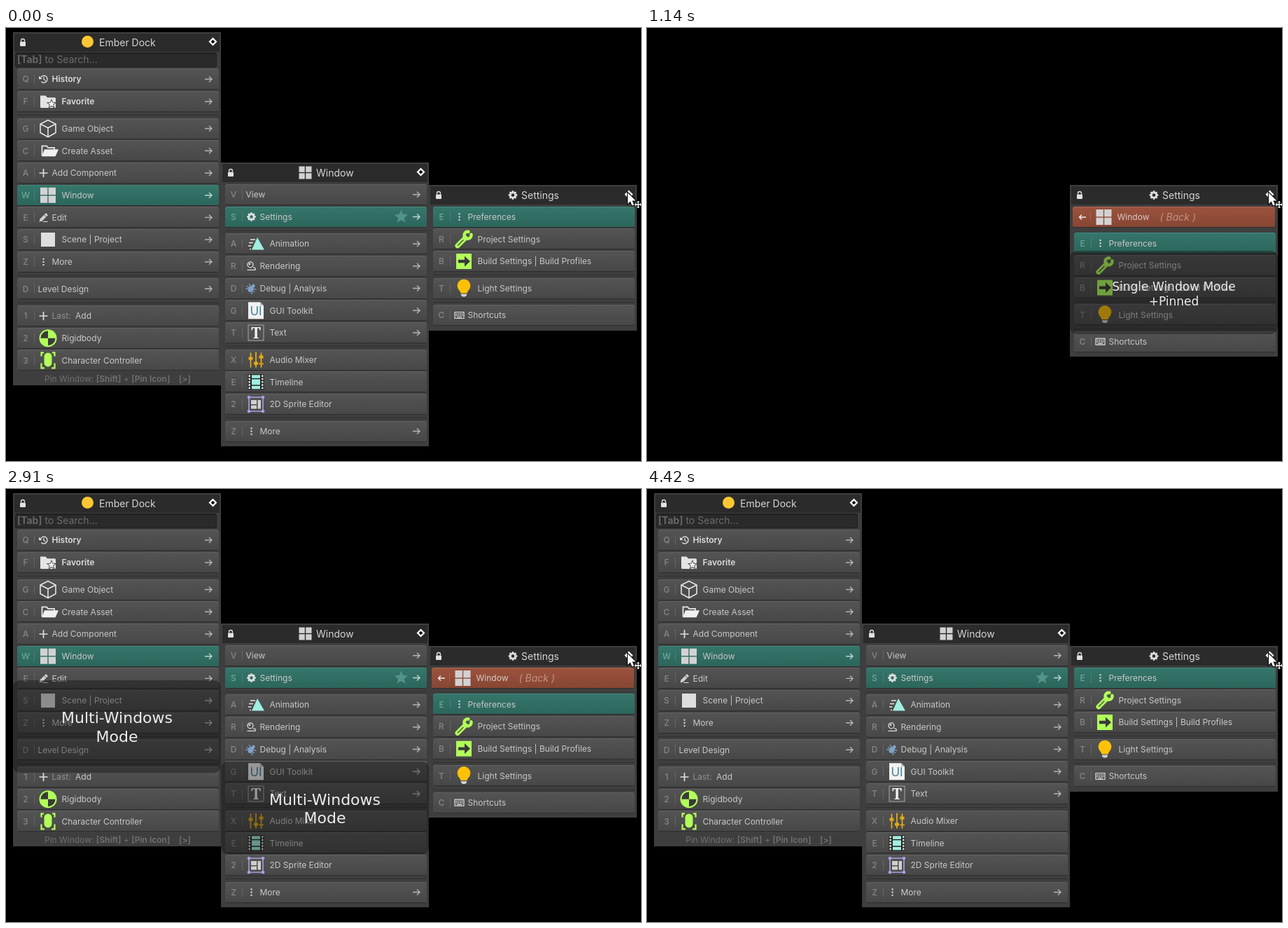
These frames come from a looping animation (907x618 px, 4490 ms). An HTML page with a canvas:

```html
<!DOCTYPE html>
<html lang="en">
<head>
<meta charset="utf-8">
<title>Menu windows</title>
<style>
  html, body { margin: 0; width: 100%; height: 100%; overflow: hidden; background: #000; }
  canvas { display: block; width: 907px; height: 618px; }
</style>
</head>
<body>
<canvas id="stage" width="907" height="618"></canvas>
<script>
const ctx = document.getElementById('stage').getContext('2d');
const LOOP = 4490;
const INTER = 'Inter, sans-serif';
const LIME = '#b2ff59', PALE = '#dedede', DARK = '#3a3a3a';

function rect(x, y, w, h, fill) {
  ctx.fillStyle = fill;
  ctx.fillRect(x, y, w, h);
}
function rounded(x, y, w, h, r, fill) {
  ctx.beginPath();
  ctx.roundRect(x, y, w, h, r);
  ctx.fillStyle = fill;
  ctx.fill();
}
function fillPath(d, color) {
  ctx.fillStyle = color;
  ctx.fill(new Path2D(d));
}
function strokePath(d, color, width = 1.4) {
  ctx.strokeStyle = color;
  ctx.lineWidth = width;
  ctx.stroke(new Path2D(d));
}
function disc(x, y, r, fill) {
  ctx.beginPath();
  ctx.arc(x, y, r, 0, Math.PI * 2);
  ctx.fillStyle = fill;
  ctx.fill();
}
function arc(x, y, r, from, to, color, width) {
  ctx.beginPath();
  ctx.arc(x, y, r, from, to);
  ctx.strokeStyle = color;
  ctx.lineWidth = width;
  ctx.stroke();
}
function text(str, x, y, color, font = '12px ' + INTER, align = 'left') {
  ctx.font = font;
  ctx.textAlign = align;
  ctx.fillStyle = color;
  ctx.fillText(str, x, y);
  return ctx.measureText(str).width;
}
function at(x, y, draw) {
  ctx.save();
  ctx.translate(x, y);
  draw();
  ctx.restore();
}
function star(r, color) {
  ctx.beginPath();
  for (let i = 0; i < 10; i++) {
    const a = i * Math.PI / 5 - Math.PI / 2, q = i % 2 ? r * 0.45 : r;
    ctx.lineTo(q * Math.cos(a), q * Math.sin(a));
  }
  ctx.fillStyle = color;
  ctx.fill();
}
function grid(size) {
  const s = size / 2 - 0.7;
  for (const x of [-size / 2, 0.7])
    for (const y of [-size / 2, 0.7]) rect(x, y, s, s, '#d2d2d2');
}

// Icons are drawn around their own centre.
const icons = {
  clock() {
    arc(0.5, 0, 5, -2.7, 2.4, PALE, 1.4);
    fillPath('M-6.5-4.5V0h4.5z', PALE);
    strokePath('M.5-3V.5L3 2', PALE, 1.3);
  },
  favorite() {
    fillPath('M-11-8.5h7.5l2.5 2.8H9.5q1.5 0 1.5 1.5V7.5Q11 9 9.500 9h-19Q-11 9-11 7.500z', '#e4e4e4');
    at(5, 3.5, () => { star(7.6, '#4b4b4b'); star(5.2, '#f2f2f2'); });
  },
  cube() {
    strokePath('M0-12L11-6.500V6L0 12-11 6V-6.500zM-11-6.500L0-1 11-6.500M0-1V12', '#e4e4e4', 1.6);
  },
  folder() {
    strokePath('M-8.500 7V-7h6.500l2 2.500H9v3', '#e8e8e8', 1.8);
    fillPath('M-5-2H15L10.500 8H-9z', '#f0f0f0');
  },
  plus() { strokePath('M-6 0H6M0-6V6', PALE, 1.7); },
  window() { grid(22); },
  pencil() {
    fillPath('M-6 6l1-4L3.500-6.500 6.500-3.500-2 5z', '#cfcfcf');
    strokePath('M1-4L4.500-.5', '#505050', 1);
    strokePath('M-1 6H6', '#cfcfcf', 1.2);
  },
  scene() { rect(-10, -10, 20, 20, PALE); },
  dots() { for (const y of [-4.2, 0, 4.2]) rect(-1, y - 1, 2.1, 2.1, PALE); },
  rigid() {
    disc(0, 0, 12.5, LIME);
    fillPath('M0 0V-10.500A10.500 10.500 0 0 0-10.500 0zM0 0V10.500A10.500 10.500 0 0 0 10.500 0z', DARK);
  },
  capsule() {
    rounded(-5.5, -11, 11, 20, 5.5, LIME);
    strokePath('M-6-11H-9.500V-6M6-11H9.500V-6M-9.500 4V11H-5M9.500 4V11H5', LIME, 2.2);
  },
  gear() {
    arc(0, 0, 3.7, 0, 7, PALE, 2.8);
    for (let i = 0; i < 8; i++) {
      ctx.rotate(Math.PI / 4);
      rect(-1.3, -6.3, 2.6, 2.6, PALE);
    }
  },
  motion() {
    fillPath('M2-9L12 8.500H-6z', '#a2eee0');
    strokePath('M-8-6H-1M-10-1.500H-4M-11 3H-6.500M-9 7.500H-7', '#e4e4e4', 1.5);
  },
  render() {
    arc(-1.5, -2, 4, 0, 7, PALE, 1.3);
    strokePath('M-6 5.500H5.500Q7 2 2.500 2', PALE, 1.3);
    disc(-2.500, -3, 1.4, PALE);
  },
  bug() {
    ctx.rotate(0.7);
    ctx.beginPath();
    ctx.ellipse(0, 1, 3.6, 5.2, 0, 0, 7);
    ctx.fillStyle = '#7fa1c6';
    ctx.fill();
    disc(0, -4.500, 2.3, '#7fa1c6');
    strokePath('M-6.500-3L-3-1M6.500-3L3-1M-7 1.500H7M-6 6L-3 3M6 6L3 3', '#7fa1c6', 1.3);
  },
  ui() {
    fillPath('M-11-12H6L11-7V12H-11z', '#f2f2f2');
    fillPath('M6-12L11-7H6z', '#b9c3c6');
    text('UI', 0, 7, '#3f8398', '17px ' + INTER, 'center');
  },
  type() {
    rect(-11.5, -11.5, 23, 23, '#a8a8a8');
    rect(-10.5, -10.5, 21, 21, '#515151');
    text('T', 0, 7.5, '#f4f4f4', 'bold 21px "Noto Serif", serif', 'center');
  },
  mixer() {
    const c = '#e5ac14';
    strokePath('M-7.500-10V11M0-11V11M7.500-10V11', c, 1.8);
    rect(-10.5, -4, 6, 4, c);
    rect(-3, 3, 6, 4, c);
    rect(4.5, -6, 6, 4, c);
    rect(4, 5, 7, 1.5, c);
  },
  film() {
    rect(-11.5, -11, 23, 22, '#242424');
    for (let i = 0; i < 5; i++)
      for (const x of [-10.5, 8]) rect(x, -10 + i * 4.3, 2.5, 2.7, '#d8d8d8');
    rect(-6, -10, 12, 4.500, '#a2eee0');
    rect(-6, -4, 12, 8, '#a2eee0');
    rect(-6, 5.500, 12, 4.500, '#a2eee0');
  },
  sprite() {
    strokePath('M-10-10H10V10H-10z', '#a9a0e2', 1.6);
    for (const x of [-10, 10]) for (const y of [-10, 10]) disc(x, y, 2.3, '#a9a0e2');
    rect(-7, -6, 8, 6, '#cfcfcf');
    rect(-7, 1.5, 8, 5, '#cfcfcf');
    rect(2.5, -6, 4.5, 12.5, '#cfcfcf');
  },
  wrench() {
    ctx.lineCap = 'round';
    strokePath('M-9 9.500L2-1.500', LIME, 7);
    arc(5.5, -5.5, 5, -0.2, 4.9, LIME, 4.5);
    strokePath('M-8.500 9L-1 1.500', '#4a4a4a', 1.3);
  },
  build() {
    rect(-11, -11, 22, 22, LIME);
    fillPath('M-8-2.200H1V-7.500L9 0 1 7.500V2.200H-8z', DARK);
  },
  bulb() {
    fillPath('M-9.500-3.500A9.500 9.500 0 0 1 9.500-3.500Q9 1 5.500 4.500L4.500 7h-9L-5.500 4.500Q-9 1-9.500-3.500z', '#ffc107');
    fillPath('M-4 8H4V10L2 12H-2L-4 10z', '#d0d0d0');
  },
  keys() {
    strokePath('M-6.500-4.500H6.500V4.500H-6.500z', PALE, 1.2);
    for (let i = 0; i < 4; i++)
      for (const y of [-2.8, -0.3]) rect(-5 + i * 2.7, y, 1.7, 1.5, PALE);
    rect(-3.5, 2.2, 7, 1.2, PALE);
  }
};
const SMALL = ['clock', 'plus', 'pencil', 'dots', 'gear', 'render', 'bug', 'keys'];

// Rows: centre y, key, icon, label, flags (a arrow, s selected, b bold, f starred)
const mainMenu = {
  x: 10, y: 6, h: 504, title: 'Ember Dock', titleX: 133,
  mark: () => at(116.5, 19.5, () => disc(0, 0, 8.5, '#fdc633')),
  gaps: [124, 353, 392],
  rows: [
    [73, 'Q', 'clock', 'History', 'ab'], [105, 'F', 'favorite', 'Favorite', 'ab'],
    [143.5, 'G', 'cube', 'Game Object', 'a'], [175.3, 'C', 'folder', 'Create Asset', 'a'],
    [207, 'A', 'plus', 'Add Component', 'a'], [238.7, 'W', 'window', 'Window', 'as'],
    [270.4, 'E', 'pencil', 'Edit', 'a'], [302, 'S', 'scene', 'Scene | Project', 'a'],
    [333.8, 'Z', 'dots', 'More', 'a'], [372.3, 'D', '', 'Level Design', 'a'],
    [411, '1', 'plus', 'Add', 'l'], [442.7, '2', 'rigid', 'Rigidbody', ''],
    [474.4, '3', 'capsule', 'Character Controller', '']
  ]
};
const windowMenu = {
  x: 307, y: 192, h: 405, title: 'Window', titleX: 443,
  mark: () => at(427.5, 206.5, () => grid(18)),
  gaps: [289, 454, 556],
  rows: [
    [237.8, 'V', '', 'View', 'a'], [269.5, 'S', 'gear', 'Settings', 'asf'],
    [308, 'A', 'motion', 'Animation', 'a'], [339.8, 'R', 'render', 'Rendering', 'a'],
    [371.5, 'D', 'bug', 'Debug | Analysis', 'a'], [403.3, 'G', 'ui', 'GUI Toolkit', 'a'],
    [435, 'T', 'type', 'Text', 'a'], [473.6, 'X', 'mixer', 'Audio Mixer', ''],
    [505.3, 'E', 'film', 'Timeline', ''], [537, '2', 'sprite', '2D Sprite Editor', ''],
    [575.5, 'Z', 'dots', 'More', 'a']
  ]
};
const settingsMenu = {
  x: 604, y: 224, h: 208, title: 'Settings', titleX: 736,
  mark: () => at(724, 238.5, icons.gear),
  gaps: [352, 391],
  rows: [
    [269.5, 'E', 'dots', 'Preferences', 's'], [301.2, 'R', 'wrench', 'Project Settings', ''],
    [333, 'B', 'build', 'Build Settings | Build Profiles', ''],
    [371.5, 'T', 'bulb', 'Light Settings', ''], [410, 'C', 'keys', 'Shortcuts', '']
  ]
};

function bar(x, cy, w, tones) {
  const y = Math.round(cy - 15), g = ctx.createLinearGradient(0, y, 0, y + 30);
  g.addColorStop(0, tones[0]);
  g.addColorStop(1, tones[1]);
  rounded(x, y, w, 30, 3, '#2d2d2d');
  rounded(x, y, w, 29, 3, tones[2]);
  rounded(x, y + 1, w, 28, 3, g);
}
function divider(x, cy) {
  rect(x, Math.round(cy) - 7, 1, 14, 'rgba(255,255,255,.13)');
}
function row(x, [cy, key, icon, label, flags]) {
  const on = flags.includes('s');
  bar(x, cy, 288, on ? ['#35766b', '#2c655b', '#438a7e'] : ['#545454', '#474747', '#626262']);
  const base = cy + 4.4;
  text(key, x + 12, base, on ? '#6ba69b' : '#868686', '500 12px ' + INTER, 'center');
  divider(x + 24, cy);
  const small = SMALL.includes(icon);
  if (icon) at(x + (small ? 37.5 : 44), cy, icons[icon]);
  let tx = x + (!icon ? 29.5 : small ? 49.5 : 63.5);
  if (flags.includes('l')) {
    text('Last:', tx, base, '#929292');
    tx = x + 83;
  }
  const bold = flags.includes('b');
  text(label, tx, base, bold ? '#dcdcdc' : '#c8c8c8', (bold ? '600 ' : '') + '12px ' + INTER);
  if (flags.includes('a'))
    at(x + 273, cy, () => strokePath('M-5 0H5M1-4L5 0 1 4', on ? '#bcd6d1' : '#b4b4b4', 1.4));
  if (flags.includes('f')) at(x + 251.5, cy, () => star(10, '#529488'));
}
function lock(x, y) {
  rounded(x - 4, y - 1, 8, 6.5, 1, '#e2e2e2');
  at(x, y, () => strokePath('M-2.500-1V-2.500A2.500 2.500 0 0 1 2.500-2.500V-1', '#e2e2e2', 1.3));
}
function pin(x, y, filled) {
  at(x, y, () => {
    fillPath('M0-6L6 0 0 6-6 0z', '#fff');
    if (!filled) fillPath('M0-2.800L2.800 0 0 2.800-2.800 0z', '#000');
  });
}
function backRow() {
  bar(608, 270, 289, ['#9c533e', '#864533', '#ad6751']);
  at(622, 270, () => strokePath('M5 0H-4.500M-1-3.500L-4.500 0-1 3.500', '#eee', 1.4));
  divider(633, 270);
  at(652.5, 270, icons.window);
  text('Window', 671.5, 274.4, '#d8cbc7');
  text('( Back )', 732.5, 274.8, '#c19383', 'italic 14px ' + INTER);
}
function menu(m, back = false) {
  const { x, y } = m, shift = back ? 37.6 : 0;
  rect(x, y, 297, m.h + (back ? 37 : 0), '#3e3e3e');
  rect(x + 2, y + 2, 293, 26, '#2b2b2b');
  lock(x + 14, y + 14.5);
  m.mark();
  text(m.title, m.titleX, y + 19.5, '#d4d4d4', '14px ' + INTER);
  pin(x + 285.5, y + 13.5, back);
  for (const gy of m.gaps) rect(x + 6, Math.round(gy + shift), 288, 1, '#313131');
  if (back) backRow();
  for (const [cy, ...rest] of m.rows) row(x + 6, [cy + shift, ...rest]);
}
function runs(parts, x, y, size, color) {
  parts.forEach((part, i) => {
    x += text(part, x, y, color, (i % 2 ? '600 ' : '') + size + 'px ' + INTER);
  });
}
function mainExtras() {
  rounded(13, 35, 288, 21, 3, '#1f1f1f');
  rounded(14, 37, 286, 18, 2, '#2a2a2a');
  runs(['', '[Tab]', ' to Search...'], 16, 50.3, 14, '#6c6c6c');
  runs(['Pin Window: ', '[Shift]', ' + ', '[Pin Icon]'], 55, 505, 12, '#707070');
  text('[>]', 247, 505, '#707070', '600 12px ' + INTER);
}
function toast(x, top, h, size, lines, baseline, gap, alpha) {
  if (alpha <= 0) return;
  ctx.save();
  ctx.globalAlpha = alpha;
  rounded(x, top, 297, h, 10, 'rgba(16,16,16,.4)');
  lines.forEach((line, i) =>
    text(line, x + 148.5, baseline + i * gap, '#ececec', size + 'px "DejaVu Sans", sans-serif', 'center'));
  ctx.restore();
}
const MULTI = ['Multi-Windows', 'Mode'];
function multiToast(x, top, h, baseline, alpha) {
  toast(x, top, h, 22, MULTI, baseline, 26.5, alpha);
}
function cursor() {
  at(888, 235, () => {
    const d = 'M0 0V16L3.700 12.600 6.200 18.500 9 17.300 6.500 11.600H11.500z';
    strokePath(d, '#000', 2);
    fillPath(d, '#fff');
  });
  at(903, 252, () => {
    strokePath('M-4 0H4M0-4V4', '#fff', 1.3);
    for (let i = 0; i < 4; i++) {
      ctx.rotate(Math.PI / 2);
      fillPath('M0-5.500L2-3H-2z', '#fff');
    }
  });
}
// Opacity falls in short hard steps once the hold is over.
function fade(t, start) {
  if (t < start) return 1;
  return Math.max(0, 1 - (Math.floor((t - start) / 69.2) + 1) / 15);
}
function draw(t) {
  rect(0, 0, 907, 618, '#000');
  const single = t >= 1140 && t < 2910;
  const back = t >= 1140 && t < 2980;
  if (!single) {
    menu(mainMenu);
    mainExtras();
    menu(windowMenu);
  }
  menu(settingsMenu, back);
  if (single) {
    toast(604, 318, 119, 17, ['Single Window Mode', '+Pinned'], 375, 20.5, fade(t, 1600));
  } else if (t >= 2910) {
    const a = fade(t, 3450);
    multiToast(10, 273, 132, 334, a);
    multiToast(307, 389, 132, 450.5, a);
    if (!back) multiToast(604, 286, 128, 347, a);
  }
  cursor();
  const pressed = (t >= 1010 && t < 1140) || (t >= 2780 && t < 2910);
  if (pressed) disc(887, 236, 29.5, 'rgba(38,225,4,.61)');
}
function tick() {
  draw(performance.now() % LOOP);
  requestAnimationFrame(tick);
}
tick();
</script>
</body>
</html>
```
